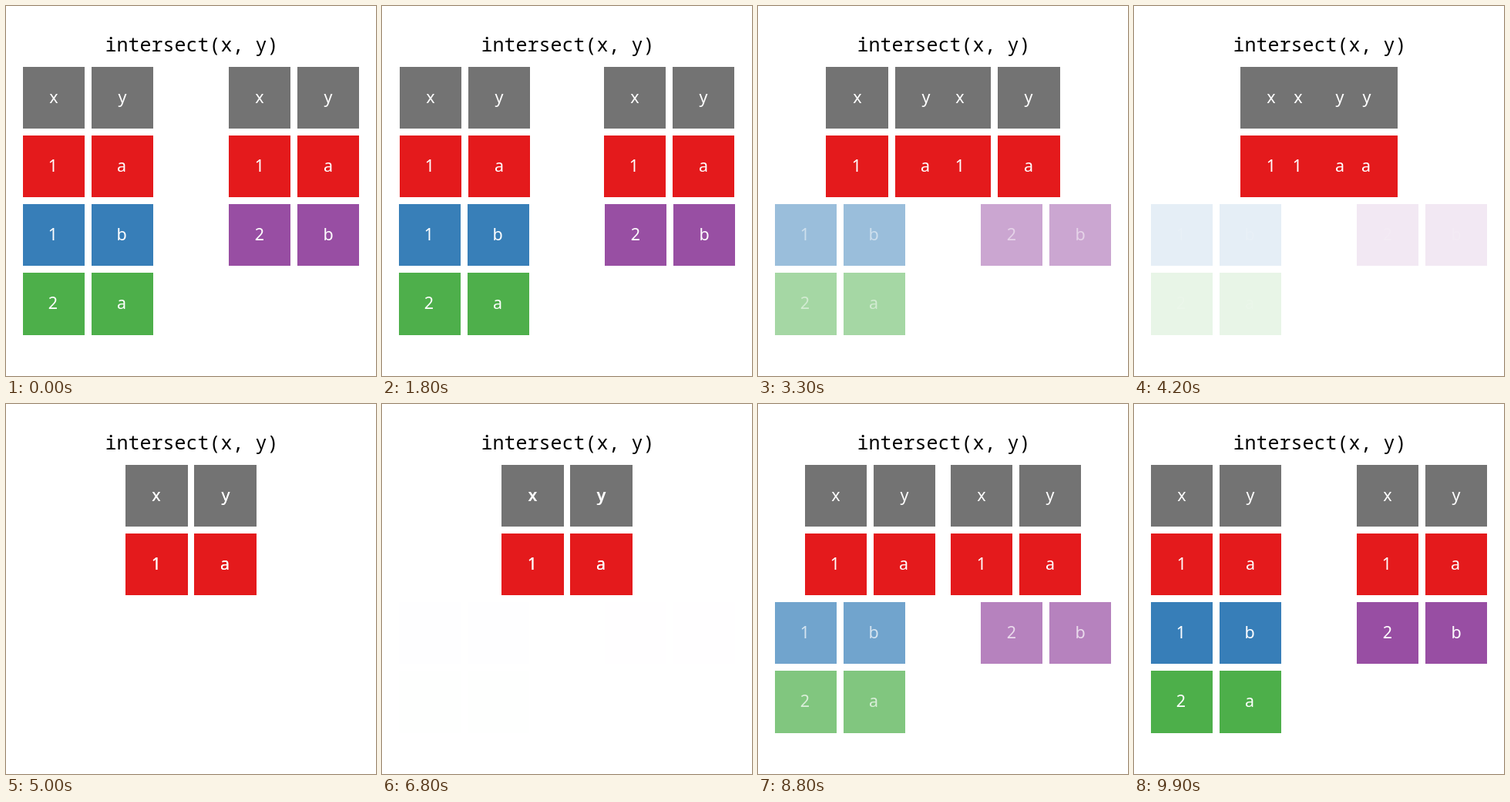
Write an HTML page with a canvas that moves like this. It is 480 by 480 pixels and loops after 10000 ms.

```html
<!DOCTYPE html>
<html lang="en">
<head>
<meta charset="utf-8">
<title>intersect</title>
<style>
  html, body { margin: 0; width: 100%; height: 100%; overflow: hidden; background: #fff; }
  canvas { display: block; width: 480px; height: 480px; }
</style>
</head>
<body>
<canvas id="stage" width="480" height="480"></canvas>
<script>
const ctx = document.getElementById('stage').getContext('2d');

const LOOP = 10000, STEP = 100;
const PITCH = 89.1, HALF = 40.15, MID = 240, TOP = 119.1;
const SHIFT = 1.5 * PITCH;
const GREY = '#737373', RED = '#e41a1c', BLUE = '#377eb8', GREEN = '#4daf4a', PURPLE = '#984ea3';

// side: -1 left table, 1 right table; the first two rows are shared
const tables = [
  { side: -1, rows: [['x', 'y', GREY], ['1', 'a', RED], ['1', 'b', BLUE], ['2', 'a', GREEN]] },
  { side: 1, rows: [['x', 'y', GREY], ['1', 'a', RED], ['2', 'b', PURPLE]] }
];

const cells = tables.flatMap(({ side, rows }) =>
  rows.flatMap(([a, b, color], row) => [a, b].map((label, col) => ({
    side, row, label, color,
    x: MID + (side * 1.5 + col - 0.5) * PITCH,
    y: TOP + row * PITCH,
    shared: row < 2
  }))));

const sine = p => (1 - Math.cos(Math.PI * Math.min(1, Math.max(0, p)))) / 2;

// 0 = tables apart, 1 = tables merged
const progress = t => t < 5000 ? sine((t - 1600) / 3400) : 1 - sine((t - 6700) / 3300);

function drawBox(c, x) {
  const l = Math.round(x - HALF), t = Math.round(c.y - HALF);
  ctx.fillStyle = c.color;
  ctx.fillRect(l, t, Math.round(x + HALF) - l, Math.round(c.y + HALF) - t);
}

function drawLabel(c, x) {
  const snap = c.row ? Math.floor : Math.round;
  ctx.fillStyle = '#fff';
  ctx.fillText(c.label, snap(x), Math.round(c.y + 7));
}

function draw(t) {
  const s = progress(t);
  ctx.globalAlpha = 1;
  ctx.fillStyle = '#fff';
  ctx.fillRect(0, 0, 480, 480);

  ctx.fillStyle = '#000';
  ctx.textAlign = 'left';
  ctx.font = '25px "Noto Sans Mono", monospace';
  ctx.fillText('intersect(x, y)', 128.5, 59);

  ctx.textAlign = 'center';
  ctx.font = '21.5px "Noto Sans", sans-serif';
  for (const paint of [drawBox, drawLabel]) {
    for (const c of cells) {
      ctx.globalAlpha = c.shared ? 1 : 1 - s;
      paint(c, c.shared ? c.x - c.side * SHIFT * s : c.x);
    }
  }
}

const start = performance.now();
function tick() {
  const t = (performance.now() - start) % LOOP;
  draw(Math.floor(t / STEP) * STEP);
  requestAnimationFrame(tick);
}
tick();
</script>
</body>
</html>
```
